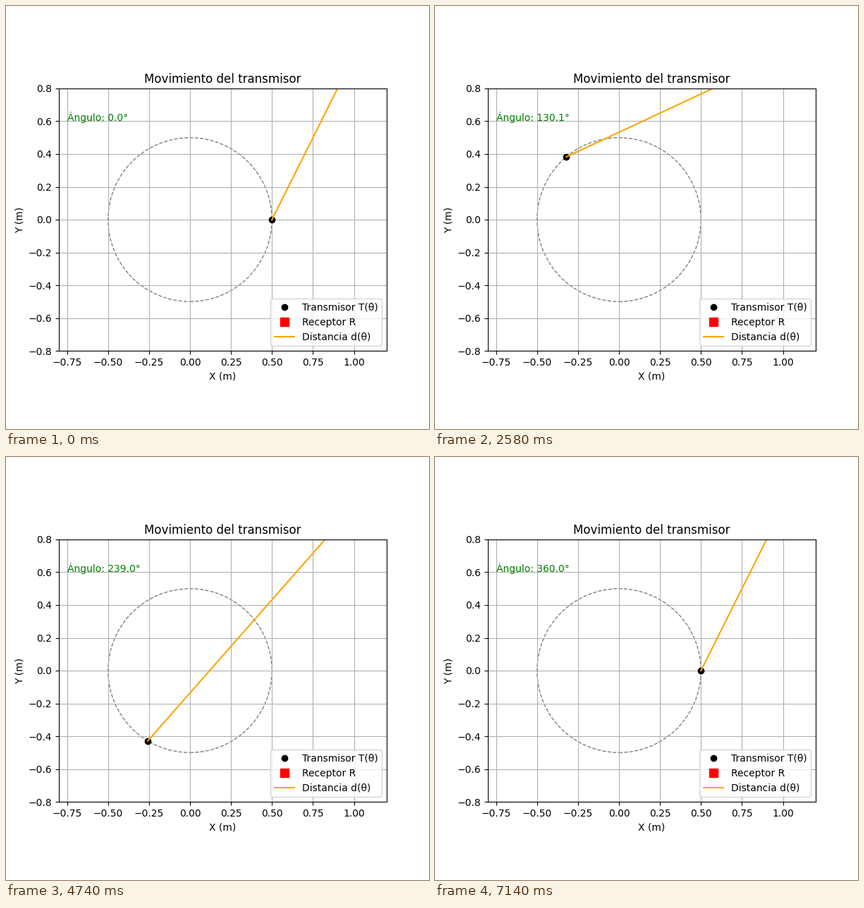
These frames come from a looping animation (600 px wide and 600 px high, 7200 ms). A matplotlib script:

```python
import numpy as np
import matplotlib.pyplot as plt
from matplotlib.animation import FuncAnimation

FRAMES = 120
INTERVAL = 60
RADIUS = 0.5
RECEIVER = (1.0, 1.0)  # lies above the visible area

plt.rcParams["font.family"] = "DejaVu Sans"

angles = np.linspace(0, 2 * np.pi, FRAMES)

fig, ax = plt.subplots(figsize=(6, 6), dpi=100)
ax.set_xlim(-0.8, 1.2)
ax.set_ylim(-0.8, 0.8)
ax.set_aspect("equal")
ax.grid(True)
ax.set_title("Movimiento del transmisor")
ax.set_xlabel("X (m)")
ax.set_ylabel("Y (m)")

ax.add_patch(plt.Circle((0, 0), RADIUS, color="gray", linestyle="--", fill=False))
transmitter, = ax.plot([], [], "ko", label="Transmisor T(θ)")
ax.plot(*RECEIVER, "rs", markersize=8, label="Receptor R")
distance, = ax.plot([], [], color="orange", label="Distancia d(θ)")
angle_text = ax.text(-0.75, 0.6, "", color="green")
ax.legend(loc="lower right")


def update(i):
    theta = angles[i]
    x, y = RADIUS * np.cos(theta), RADIUS * np.sin(theta)
    transmitter.set_data([x], [y])
    distance.set_data([x, RECEIVER[0]], [y, RECEIVER[1]])
    angle_text.set_text(f"Ángulo: {np.degrees(theta):.1f}°")
    return transmitter, distance, angle_text


anim = FuncAnimation(fig, update, frames=FRAMES, interval=INTERVAL,
                     repeat=True, repeat_delay=0)
plt.show()
```
